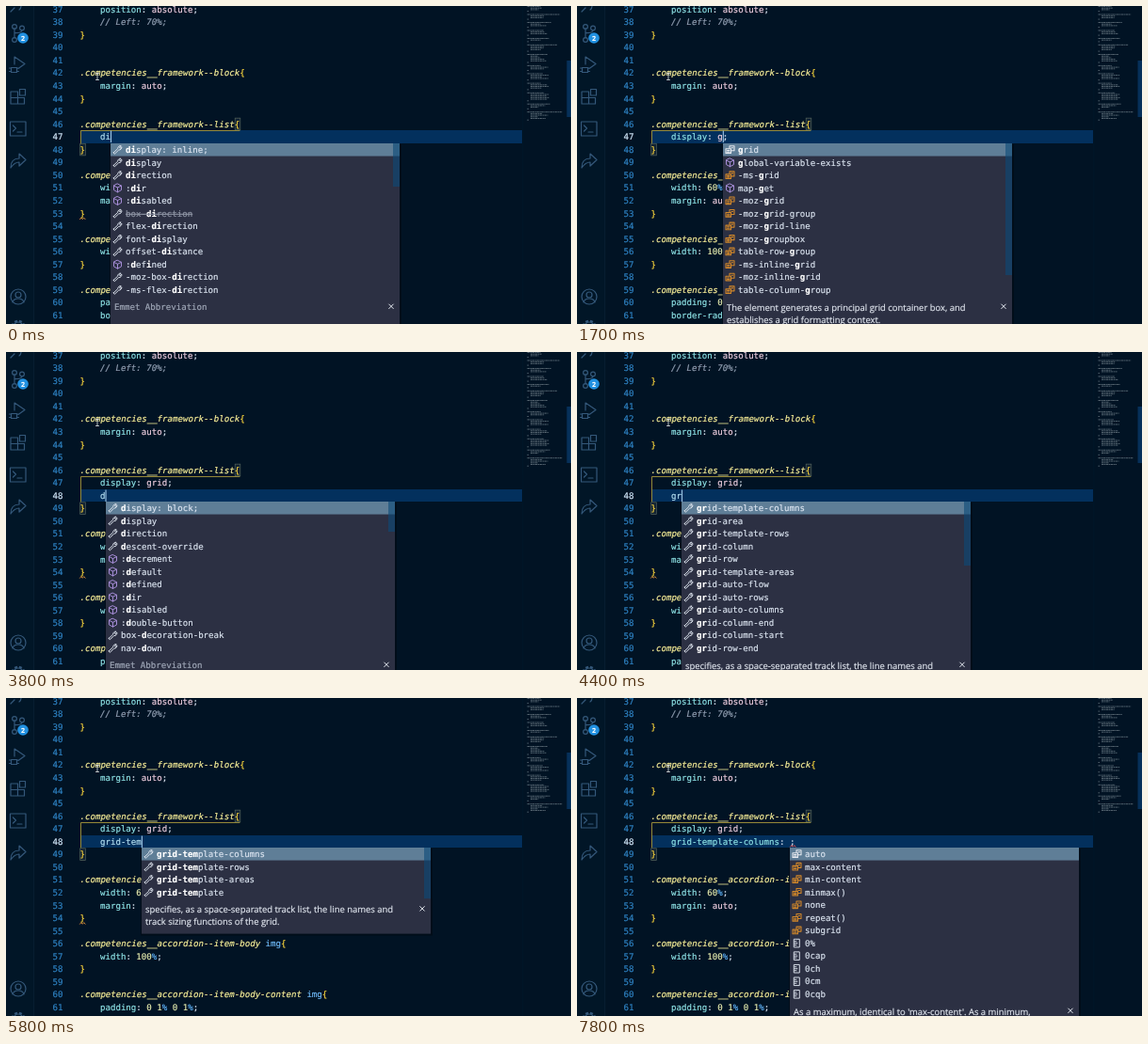
An HTML page that plays this animation: 600 px wide and 338 px high, repeating every 8 s.

```html
<!DOCTYPE html>
<html lang="en">
<head>
<meta charset="utf-8">
<title>Typing a grid rule</title>
<style>
  html, body { margin: 0; width: 100%; height: 100%; overflow: hidden; background: #011324; }
  svg { display: block; width: 100vw; height: 100vh; }
  text { font: 9.1px "DejaVu Sans Mono", monospace; white-space: pre; text-rendering: geometricPrecision; color: #dbe4f0; }
  text, tspan { fill: currentColor; stroke: currentColor; stroke-width: .18px; }
  .num { color: #2f83c4; }
  .now { color: #d5e9fb; }
  .selector { color: #fdf29a; font-style: italic; }
  .brace { color: #ffd83d; }
  .tag { color: #6fb8f5; }
  .prop { color: #8fe3e6; }
  .word { color: #f0cfe0; }
  .digit { color: #e9eeb0; }
  .unit { color: #5cadf2; }
  .px { font-style: italic; }
  .comment { color: #929fb2; font-style: italic; }
  .draft { color: #b4def0; }
  .hit { color: #fff; font-weight: bold; }
  .old { color: #8d93a3; text-decoration: line-through; }
  .hint { color: #a0a8b8; }
  .doc { font: 9.45px "Open Sans", "Noto Sans", sans-serif; color: #e0e5ee; }
  .badge { font: bold 7px "Open Sans", sans-serif; color: #fff; text-anchor: middle; }
  .line { fill: none; stroke-linejoin: round; stroke-linecap: round; }
</style>
</head>
<body>
<svg viewBox="0 0 600 338" preserveAspectRatio="none">
  <defs>
    <path id="wrench" class="line" stroke="#dbe2ec" d="M-4.2 3 0.2-1.2A3 3 0 0 1 3.6-4.2L2-2.5 2.6-1.5 4.4-3A3 3 0 0 1 1.2.3L-3 4.3Q-4 4.6-4.2 3Z"/>
    <path id="cube" class="line" stroke="#a58cd6" d="M0-4.4 4-2.4V2.2L0 4.4-4 2.2V-2.4ZM-4-2.4 0-.4 4-2.4M0-.4V4.4"/>
    <g id="value" class="line" stroke="currentColor" stroke-width="1.1">
      <path d="M-.5-1.5V-4H4.5V1H1.5M1.5-2H3"/>
      <path d="M-4.5-1H1V3.6H-4.5ZM-3 .7H-.5M-3 2.2H-.5"/>
    </g>
    <path id="unit" class="line" stroke="#d5dbe6" d="M-2.8-4.3H2.8V4.3H-2.8ZM-2.8-2H-.6M-2.8 0H.4M-2.8 2H-.6"/>
  </defs>
  <rect width="600" height="338" fill="#011324"/>
  <g id="chrome"></g>
  <g id="editor"></g>
</svg>
<script>
const CHAR = 5.478, ROW = 13.55, LEFT = 78.5, INDENT = 100, POPUP = 307, LOOP = 8000;
const byId = id => document.getElementById(id);
const rowY = n => 139 + (n - 47) * ROW;
const rowTop = n => Math.round(rowY(n) - ROW / 2);
const span = (cls, s) => `<tspan class="${cls}">${s}</tspan>`;
const text = (x, y, s, cls = '') => `<text x="${x}" y="${y + 3.2}" class="${cls}">${s}</text>`;
const rect = (x, y, w, h, fill, extra = '') =>
  `<rect x="${x}" y="${y}" width="${w}" height="${h}" fill="${fill}" ${extra}/>`;
const path = (d, color, width = 1) =>
  `<path class="line" d="${d}" stroke="${color}" stroke-width="${width}"/>`;
const squiggle = (x, y, color) => path(`M${x} ${y}l1.4-1.6 1.4 1.6 1.4-1.6 1.4 1.6`, color, .9);

const ABOVE = ['position: absolute;', '// Left: 70%;', '}', '', '',
  '.competencies__framework--block{', 'margin: auto;', '}', '',
  '.competencies__framework--list{'];
const BELOW = ['}', '', '.competencies__accordion--item{', 'width: 60%;', 'margin: auto;', '}', '',
  '.competencies__accordion--item-body img{', 'width: 100%;', '}', '',
  '.competencies__accordion--item-body-content img{', 'padding: 0 1% 0 1%;', 'border-radius: 10px;'];

const GRID_DOC = ['specifies, as a space-separated track list, the line names and', 'track sizing functions of the grid.'];
const LISTS = {
  inline: { bar: 46, icon: 'wrench', items: ['display: inline;', 'display', 'direction', ':dir', ':disabled',
    '~box-direction', 'flex-direction', 'font-display', 'offset-distance', ':defined',
    '-moz-box-direction', '-ms-flex-direction'] },
  boxes: { bar: 60, icon: 'value', doc: ['The element generates a block-level box.'], items: ['block', 'contents',
    'flex', 'flow-root', 'grid', 'inline', 'inline-block', 'inline-flex', 'list-item', 'none', 'table', 'table-cell'] },
  grids: { bar: 140, icon: 'value',
    doc: ['The element generates a principal grid container box, and', 'establishes a grid formatting context.'],
    items: ['grid', 'global-variable-exists', '-ms-grid', 'map-get', '-moz-grid', '-moz-grid-group',
      '-moz-grid-line', '-moz-groupbox', 'table-row-group', '-ms-inline-grid', '-moz-inline-grid',
      'table-column-group', 'inline-grid', 'subgrid'] },
  block: { bar: 32, icon: 'wrench', items: ['display: block;', 'display', 'direction', 'descent-override',
    ':decrement', ':default', ':defined', ':dir', ':disabled', ':double-button', 'box-decoration-break', 'nav-down'] },
  tracks: { bar: 68, icon: 'wrench', doc: GRID_DOC, items: ['grid-template-columns', 'grid-area',
    'grid-template-rows', 'grid-column', 'grid-row', 'grid-template-areas', 'grid-auto-flow', 'grid-auto-rows',
    'grid-auto-columns', 'grid-column-end', 'grid-column-start', 'grid-row-end', 'grid-template'] },
  sizes: { bar: 0, icon: 'value',
    doc: ["As a maximum, identical to 'max-content'. As a minimum,", 'represents the largest minimum size.'],
    items: ['auto', 'max-content', 'min-content', 'minmax()', 'none', 'repeat()', 'subgrid',
      '0%', '0cap', '0ch', '0cm', '0cqb'] }
};

// time, line number, typed text (| caret shown, ¦ caret hidden), open list
const STEPS = [
  [0, 47, 'di|', 'inline'], [100, 47, 'dis|', 'inline'], [200, 47, 'disp|', 'inline'],
  [300, 47, 'displ|', 'inline'], [500, 47, 'displa|', 'inline'], [600, 47, 'display|', 'inline'],
  [1100, 47, 'display: |;', 'boxes'], [1600, 47, 'display: g|;', 'grids'],
  [1800, 47, 'display: gr|;', 'grids'], [1900, 47, 'display: gri|;', 'grids'],
  [2100, 47, 'display: grid|;', 'grids'], [2500, 47, 'display: grid;|'],
  [2900, 48, '|'], [3300, 48, '¦'], [3600, 48, 'd|', 'block'],
  [4100, 48, '|'], [4300, 48, 'g|', 'tracks'], [4400, 48, 'gr|', 'tracks'],
  [4600, 48, 'gri|', 'tracks'], [4800, 48, 'grid|', 'tracks'], [5000, 48, 'grid-|', 'tracks'],
  [5500, 48, 'grid-t|', 'tracks'], [5600, 48, 'grid-te|', 'tracks'], [5800, 48, 'grid-tem|', 'tracks'],
  [5900, 48, 'grid-temp|', 'tracks'], [6000, 48, 'grid-templ|', 'tracks'],
  [6300, 48, 'grid-template-columns: |;', 'sizes'], [6800, 48, 'grid-template-columns: ¦;', 'sizes'],
  [7300, 48, 'grid-template-columns: |;', 'sizes'], [7800, 48, 'grid-template-columns: ¦;', 'sizes']
];

function paint(s) {
  if (s === '}') return span('brace', s);
  if (s.startsWith('//')) return span('comment', s);
  const rule = s.match(/^(\.\S+?)( img)?\{$/);
  if (rule) return span('selector', rule[1]) + span('tag', rule[2] || '') + span('brace', '{');
  const pair = s.match(/^([\w-]+): (.*);$/);
  if (!pair) return span('draft', s);
  const value = pair[2].replace(/(\d+)(px|%)?|[a-z]+/g, (word, n, unit = '') =>
    n ? span('digit', n) + span(unit === 'px' ? 'unit px' : 'unit', unit) : span('word', word));
  return span('prop', pair[1]) + ': ' + value + ';';
}

// Positions of the typed letters in a label, or null when it does not match.
function matchLetters(label, query) {
  const start = label.indexOf(query);
  if (start >= 0) return [...query].map((_, i) => start + i);
  const hits = [];
  let from = 0;
  for (const c of query) {
    const at = label.indexOf(c, from);
    if (at < 0) return null;
    hits.push(at);
    from = at + 1;
  }
  return hits;
}

function iconFor(label, fallback) {
  if (/^(:|global|map)/.test(label)) return 'cube';
  return /^0/.test(label) ? 'unit' : fallback;
}

function popup(x, top, list, query) {
  const rows = list.items
    .map(item => ({ old: item[0] === '~', label: item.replace('~', '') }))
    .map(item => ({ ...item, hits: matchLetters(item.label, query) }))
    .filter(item => item.hits).slice(0, 12);
  const bottom = top + rows.length * ROW;
  const docHeight = list.doc ? 11 + 13.2 * list.doc.length : 30;
  let out = rect(x - 1, top + 1, POPUP + 3, bottom - top + docHeight + 1, '#000', 'opacity=".3"')
    + rect(x, top, POPUP, bottom - top + docHeight, '#2c3043')
    + rect(x, top, POPUP, ROW, '#5f7e97')
    + rect(x + POPUP - 7, top, 7, Math.min(list.bar, bottom - top), '#0b4a78', 'opacity=".6"');
  rows.forEach(({ label, hits, old }, i) => {
    const y = top + (i + .5) * ROW;
    const letters = [...label].map((c, k) => hits.includes(k) ? span('hit', c) : c).join('');
    out += `<use href="#${iconFor(label, list.icon)}" x="${x + 7.5}" y="${y}" color="${i ? '#d0862a' : '#e6e9ef'}"/>`
      + text(x + 16, y, letters, old ? 'old' : '');
  });
  if (list.doc) list.doc.forEach((s, i) => out += text(x + 4, bottom + 11.7 + i * 13.2, s, 'doc'));
  else out += text(x + 4, bottom + 11, 'Emmet Abbreviation', 'hint');
  const cx = x + POPUP - 9, cy = bottom + 10.7;
  return out + path(`M${cx - 2.3} ${cy - 2.3}l4.6 4.6m0-4.6l-4.6 4.6`, '#e4e9f0');
}

function editor([, row, marked, listName]) {
  const typed = marked.replace(/[|¦]/, '');
  const before = marked.split(/[|¦]/)[0];
  const caretX = INDENT + before.length * CHAR;
  const top = rowTop(row), bottom = rowTop(row + 1), guideTop = rowTop(47) + .5;
  const lines = [...ABOVE, ...(row === 48 ? ['display: grid;'] : []), typed, ...BELOW];
  const box = (x, n) => rect(x, rowY(n) - 6.3, 5.6, 12.6, '#ffffff10', 'stroke="#56655c" stroke-width=".7"');

  let out = rect(79, top, 469, bottom - top, '#03305d')
    + path(`M248 ${guideTop}H79.5V${bottom}`, '#a8963a', .9)
    + box(243.2, 46) + box(78.7, row + 1);
  lines.slice(0, 25).forEach((s, i) => {
    const n = 37 + i;
    out += text(49.5, rowY(n), n, n === row ? 'now' : 'num')
      + text(/^[.}]/.test(s) ? LEFT : INDENT, rowY(n), paint(s));
  });
  if (typed && !typed.endsWith(';')) out += squiggle(78.5, rowY(row + 6) + 6.4, '#e0913c');
  if (typed.endsWith(': ;')) out += squiggle(caretX + .5, bottom - .8, '#ef5350');
  out += path('M95.5 71.5h3m-1.5 0v7m-1.5 0h3', '#e6e6e6', .8);
  if (marked.includes('|')) out += rect(caretX, top + .5, 1.1, ROW - 1, '#9fc6e6');
  if (listName) out += popup(Math.round(caretX + .4), bottom, LISTS[listName], before.split(': ').pop());
  return out;
}

function minimap() {
  let seed = 11, out = '';
  const random = () => (seed = seed * 16807 % 2147483647) / 2147483647;
  const dashes = (x, y, w) =>
    `<path d="M${x} ${y}h${w}" stroke="#93a0a8" stroke-width="1" stroke-dasharray="2.6 .5 1.4 .4"/>`;
  for (let y = .5, left = 0; y < 122; y += 1.7) {
    if (left === 0) {
      out += dashes(553.5, y, 14 + random() * 24);
      left = 3 + Math.floor(random() * 4);
    } else if (--left > 1) out += dashes(557, y, 8 + random() * 12);
    else if (left === 1) out += dashes(553.5, y, 1.5);
  }
  return `<g opacity=".55">${out}</g>`;
}

function chrome() {
  const color = '#34587a';
  const icons = [
    'M14-4A5 5 0 0 1 14 4M9 2 5 6',
    'M9 23.5V34M9 28.5Q17 29 17 25.5',
    'M9 62V54L20 61.5 13 66.5M5.5 65.5h6v5h-6zM3.5 66h2M3.5 69.5h2M11.5 66h2M11.5 69.5h2',
    'M5 91h7.5v13H5zM5 97.5h14.5v6.5H12.5M14.5 88.5h6v6.5h-6z',
    'M4.5 123h16.5v15H4.5zM7.5 127l3 3-3 3M12 134h5',
    'M5 172Q5 162 14 162V157L21 163.5 14 170V166Q9 166 5 172Z',
    'M7 315Q8 311 13 311T19 315'
  ].map(d => path(d, color, 1.2)).join('');
  const ring = (x, y, r, extra = '') =>
    `<circle cx="${x}" cy="${y}" r="${r}" fill="none" stroke="${color}" stroke-width="1.2" ${extra}/>`;
  return rect(0, 0, 29.5, 338, '#011627') + rect(29.3, 0, .8, 338, '#0a2136')
    + icons + ring(9, 22, 2.4) + ring(17, 23.5, 2.4) + ring(9, 36, 2.4)
    + ring(13, 309, 8) + ring(13, 307, 3)
    + ring(13, 341, 6.2, 'stroke-dasharray="3 1.9" style="stroke-width:2.4"') + ring(13, 341, 5)
    + '<circle cx="18" cy="34" r="5.8" fill="#2190e0"/><text class="badge" x="18" y="36.6">2</text>'
    + rect(548.6, 0, .6, 338, '#02192d') + minimap()
    + rect(595.5, 58, 4.5, 60, '#06305a');
}

byId('chrome').innerHTML = chrome();
let shown;
function tick() {
  const time = performance.now() % LOOP;
  const step = STEPS.findLast(s => s[0] <= time);
  if (step !== shown) byId('editor').innerHTML = editor(shown = step);
  requestAnimationFrame(tick);
}
tick();
</script>
</body>
</html>
```
